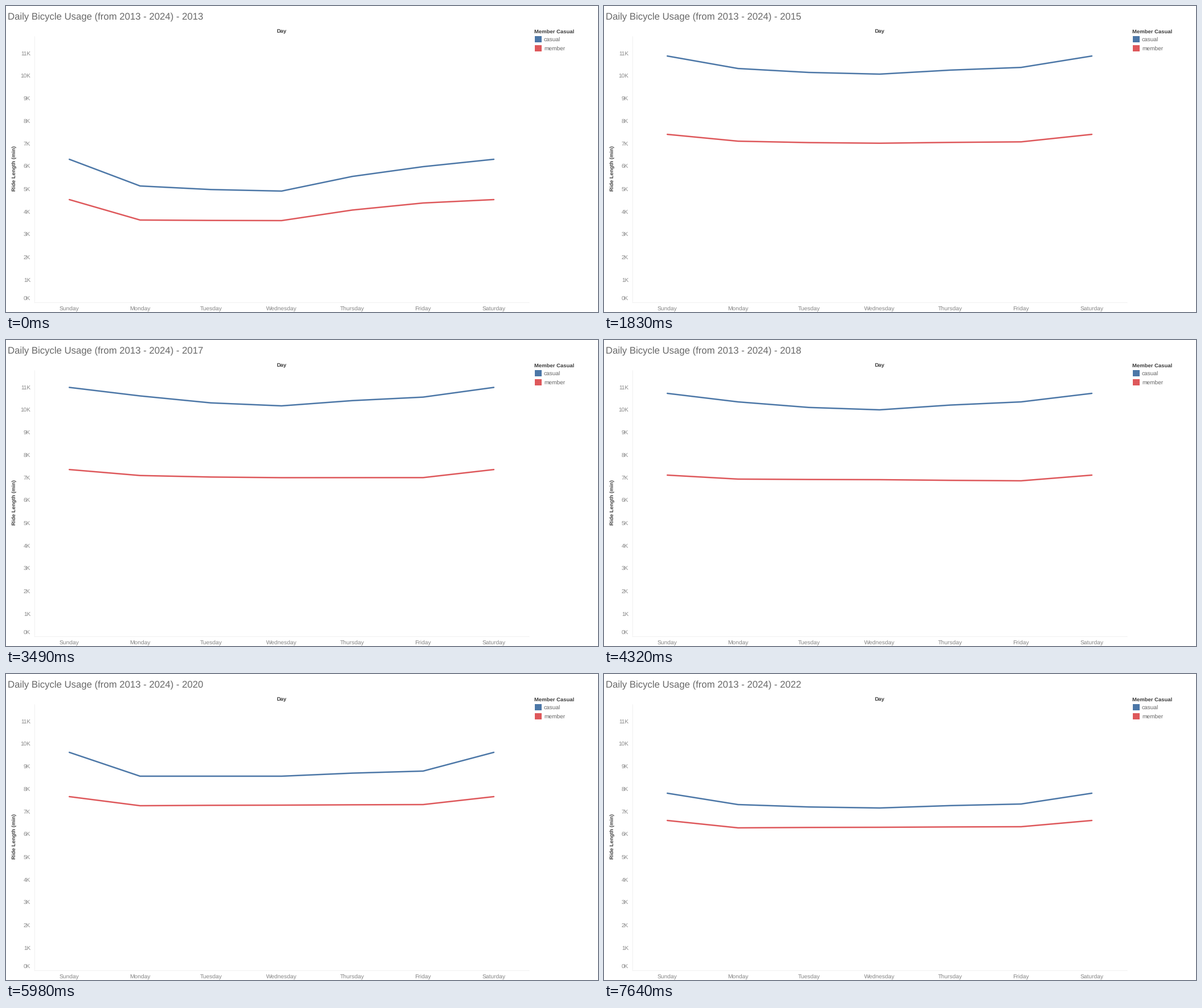
These frames come from a looping animation (1040x539 px, 8 s). A matplotlib script:

```python
import numpy as np
import matplotlib.pyplot as plt
from matplotlib.animation import FuncAnimation
from matplotlib.patches import Rectangle

W, H, DPI = 1040, 539, 100
LOOP, STEP = 8000, 20
FIRST, HOLD = 1000, 830  # ms on the first year, then on each later one
BLUE, RED = "#4c77a7", "#de585b"
DARK, GREY = "#3a3a3a", "#868686"
DAYS = ["Sunday", "Monday", "Tuesday", "Wednesday", "Thursday", "Friday", "Saturday"]
DAY_X = 111.2 + 124.3 * np.arange(7)

# Heights of weekend, Monday, midweek and Friday: casual, then member
KEYS = {
    2013: [(270, 317, 326, 283), (341, 377, 378, 347)],
    2014: [(92, 117, 123, 113), (227, 239, 242, 239)],
    2016: [(79, 94, 113, 97), (224, 236, 241, 240)],
    2018: [(94, 109, 123, 109), (238, 245, 246, 248)],
    2020: [(138, 180, 180, 171), (216, 232, 231, 230)],
    2021: [(177, 197, 204, 198), (235, 252, 253, 251)],
    2022: [(210, 230, 236, 229), (258, 271, 270, 269)],
}


def week(keys):
    """Spread key heights over seven days; the dip builds fast and eases slowly."""
    end, mon, mid, fri = keys
    tue = mon + 0.7 * (mid - mon)
    thu = fri + 0.4 * (mid - fri)
    return np.array([end, mon, tue, mid, thu, fri, end])


def weeks(year):
    """Both lines of a year; a year without keys leans on the one before."""
    if year in KEYS:
        return [week(k) for k in KEYS[year]]
    return [0.7 * a + 0.3 * b for a, b in zip(weeks(year - 1), weeks(year + 1))]


plt.rcParams.update({"font.family": "Liberation Sans", "text.hinting": "none"})
fig = plt.figure(figsize=(W / DPI, H / DPI), dpi=DPI, facecolor="white")
ax = fig.add_axes([0, 0, 1, 1])
ax.set(xlim=(0, W), ylim=(H, 0))
ax.axis("off")


def px(size):
    return size * 72 / DPI


def label(x, y, text, size, color, **kw):
    return ax.text(x, y, text, fontsize=px(size), color=color, va="baseline", **kw)


def rule(x, y):
    ax.plot(x, y, color="#f0f0f0", lw=px(1), solid_capstyle="butt")


title = label(3, 23, "", 16.7, "#696969")
label(484, 47.2, "Day", 9.5, DARK, ha="center", weight="bold")
label(17.4, 286, "Ride Length (min)", 9.4, DARK, ha="center", weight="bold",
      rotation=90, rotation_mode="anchor")

rule([49.5, 49.5], [53, 521])
rule([49, 919], [521.5, 521.5])
for k in range(12):
    mid = 522 - 39.9 * k if k else 515
    label(43, mid + 3.7, f"{k}K", 10, GREY, ha="right")
for x, day in zip(DAY_X, DAYS):
    label(x, 536.3, day, 10.2, GREY, ha="center")

label(928, 48, "Member Casual", 9.5, DARK, weight="bold")
for y, name, color in ((52.5, "casual", BLUE), (68.5, "member", RED)):
    ax.add_patch(Rectangle((929, y), 12, 11.5, facecolor=color, lw=0))
    label(945, y + 9.9, name, 10.1, "#666666")

curves = [ax.plot([], [], color=c, lw=px(2.5), solid_capstyle="round",
                  solid_joinstyle="round")[0] for c in (BLUE, RED)]


def draw(i):
    t = i * STEP + STEP / 2
    year = 2013 if t < FIRST else 2014 + int((t - FIRST) // HOLD)
    title.set_text(f"Daily Bicycle Usage (from 2013 - 2024) - {year}")
    for curve, ys in zip(curves, weeks(year)):
        curve.set_data(DAY_X, ys)
    return [title, *curves]


anim = FuncAnimation(fig, draw, frames=LOOP // STEP, interval=STEP,
                     repeat=True, repeat_delay=0, blit=False)
plt.show()
```
